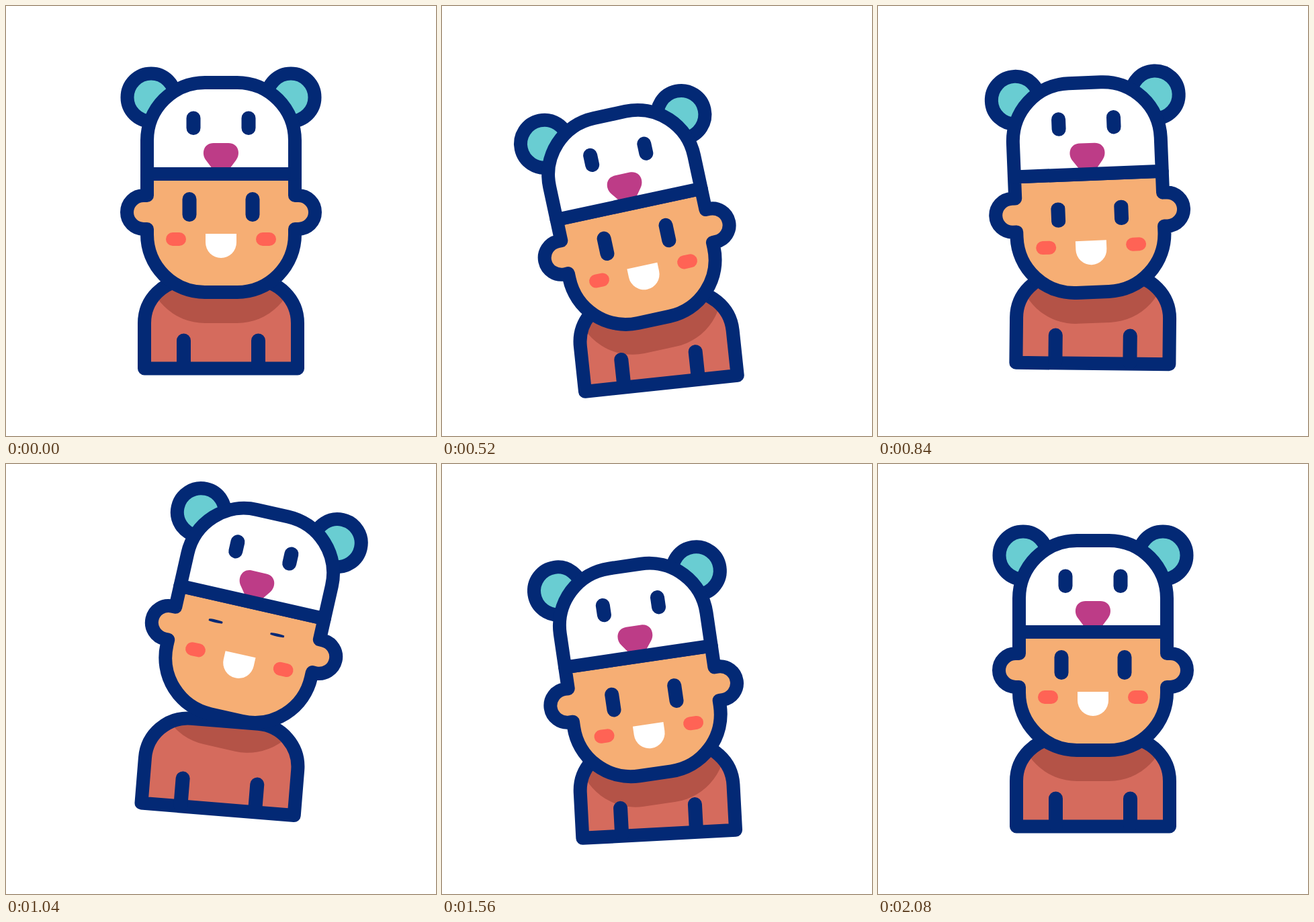
Write an HTML page without scripts that moves like this. It is 640 px wide and 640 px high and loops after 2200 ms.

```html
<!DOCTYPE html>
<html lang="en">
<head>
<meta charset="utf-8">
<title>Swaying kid in a bear hat</title>
<style>
  html, body { margin: 0; width: 100%; height: 100%; overflow: hidden; background: #fff; }
  svg { display: block; width: 100%; height: 100%; }

  .line { fill: none; stroke: #032975; stroke-width: 20; stroke-linecap: round; stroke-linejoin: round; }
  .wide { stroke-width: 21; }
  .shirt { fill: #d56b5d; }
  .shade { fill: #b45347; }
  .skin { fill: #f6ae74; }
  .white { fill: #fff; }
  .teal { fill: #69cdd2; }
  .nose { fill: #bd3c87; }
  .cheek { fill: #ff6355; }

  /* Body leads, head follows, face trails last. */
  .body, .head, .face, .eyes {
    animation: 2200ms cubic-bezier(.333, 0, .667, 1) infinite;
  }
  .body { transform-origin: 320px 479px; animation-name: sway; }
  .head { transform-origin: 320px 437px; animation-name: tilt, bob; }
  .face { animation-name: nod; }
  .eyes { transform-origin: 320px 299px; animation-name: blink; }

  @keyframes sway {
    0%, 9.1% { translate: 0 0; rotate: 0deg; }
    27.5% { translate: 0 25.5px; rotate: -6.8deg; }
    45.6% { translate: 0 -26.2px; rotate: 4.8deg; }
    66.8% { translate: 0 12.8px; rotate: -3.4deg; }
    87.1%, 100% { translate: 0 0; rotate: 0deg; }
  }
  @keyframes tilt {
    0%, 9.8% { rotate: 0deg; }
    31.4% { rotate: -8.6deg; }
    49.1% { rotate: 8.6deg; }
    70.7% { rotate: -5.3deg; }
    93%, 100% { rotate: 0deg; }
  }
  @keyframes bob {
    0%, 10.4% { translate: 0 0; }
    30.9% { translate: 0 25px; }
    49.2% { translate: 0 -25px; }
    68.4% { translate: 0 25px; }
    84.1%, 100% { translate: 0 0; }
  }
  @keyframes nod {
    0%, 15.7% { translate: 0 0; }
    35% { translate: 0 13px; }
    50.9% { translate: 0 -13px; }
    69.8% { translate: 0 13px; }
    87.7%, 100% { translate: 0 0; }
  }
  @keyframes blink {
    0%, 35% { scale: 1 1; }
    47.3% { scale: 1 .1; }
    59.1%, 100% { scale: 1 1; }
  }
</style>
</head>
<body>
<svg viewBox="0 0 640 640">
  <defs>
    <path id="torso" d="M206 539.5V472A64 64 0 0 1 270 408H370A64 64 0 0 1 434 472V539.5Z"/>
    <path id="hat" d="M210 250V200A86 86 0 0 1 296 114H344A86 86 0 0 1 430 200V250Z"/>
    <clipPath id="torso-clip"><use href="#torso"/></clipPath>
  </defs>

  <g class="body">
    <use href="#torso" class="shirt"/>
    <g clip-path="url(#torso-clip)">
      <path class="head shade" d="M210 300V386A86 86 0 0 0 296 472H344A86 86 0 0 0 430 386V300Z"/>
    </g>
    <use href="#torso" class="line"/>
    <path class="line wide" d="M264.5 498V538M375.5 498V538"/>

    <g class="head">
      <g class="line">
        <circle class="teal" cx="216" cy="136" r="35.5"/>
        <circle class="teal" cx="424" cy="136" r="35.5"/>
        <path class="skin" d="M210 250V282H205A25 25 0 0 0 205 332H210V340A86 86 0 0 0 296 426H344A86 86 0 0 0 430 340V332H435A25 25 0 0 0 435 282H430V250Z"/>
      </g>

      <g class="face">
        <path class="eyes line wide" d="M273 287.5V310.5M367 287.5V310.5"/>
        <rect class="cheek" x="238" y="337" width="30" height="20" rx="10"/>
        <rect class="cheek" x="372" y="337" width="30" height="20" rx="10"/>
        <path class="white" d="M297 339H343V352A23 23 0 0 1 297 352Z"/>
      </g>

      <use href="#hat" class="white"/>
      <path class="nose" d="M309 204H331C346 204 350 220 342 230L330 246H310L298 230C290 220 294 204 309 204Z"/>
      <use href="#hat" class="line"/>
      <path class="line wide" d="M279 167V181.5M361 167V181.5"/>
    </g>
  </g>
</svg>
</body>
</html>
```
